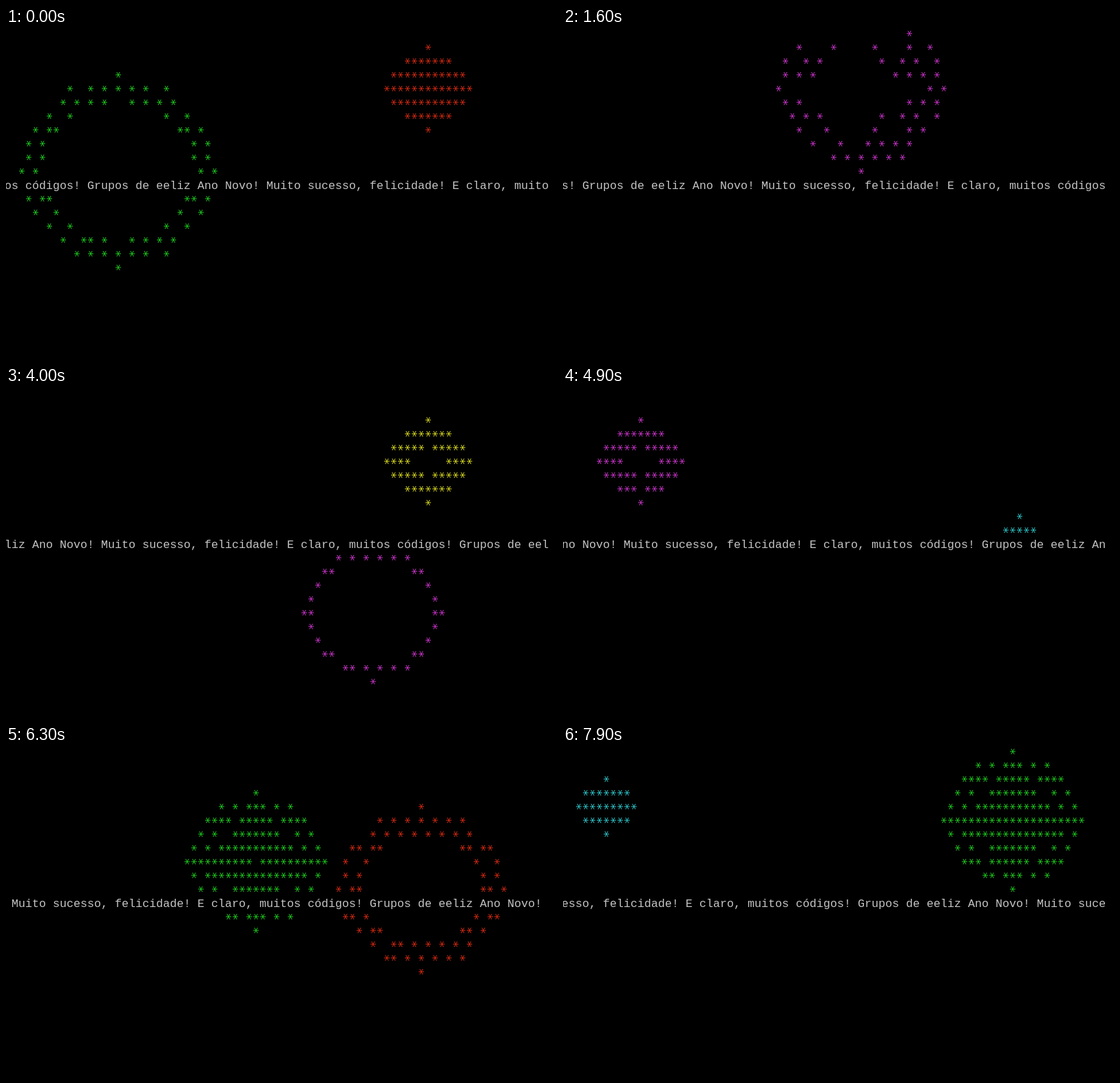
These frames come from a looping animation (800 px wide and 481 px high, 8000 ms). An HTML page with a canvas:

```html
<!DOCTYPE html>
<html lang="pt">
<head>
<meta charset="utf-8">
<style>
  html, body { margin: 0; width: 100%; height: 100%; background: #000; overflow: hidden; }
  canvas { display: block; }
</style>
</head>
<body>
<canvas id="stage" width="800" height="481"></canvas>
<script>
const ctx = document.getElementById('stage').getContext('2d');
const COLS = 80, TEXT_ROW = 11, LOOP = 8000, FIRST_TICK = -13;
const message = 'Grupos de eeliz Ano Novo! Muito sucesso, felicidade! E claro, muitos códigos! ';
const colours = {
  r: '#d42a12', g: '#1fca1f', y: '#d6d622', b: '#3a5ae0',
  m: '#c834c8', c: '#2fc4c8', w: '#d6d6d6'
};

// start tick, centre column, centre row, final radius, colour
const fireworks = [
  [-13, 16, 10, 7, 'g'], [-3, 61, 4, 3, 'r'], [1, 69, 13, 5, 'c'],
  [7, 28, 5, 5, 'y'], [18, 71, 14, 4, 'r'], [19, 42, 4, 6, 'c'],
  [24, 43, 4, 6, 'm'], [34, 20, 13, 5, 'c'], [40, 58, 7, 6, 'w'],
  [52, 34, 15, 5, 'g'], [57, 66, 9, 5, 'r'], [62, 14, 12, 6, 'c'],
  [68, 53, 16, 5, 'm'], [73, 61, 5, 3, 'y'], [80, 22, 8, 6, 'g'],
  [85, 63, 11, 4, 'r'], [91, 11, 5, 3, 'm'], [95, 66, 10, 5, 'c'],
  [98, 39, 6, 7, 'w'], [104, 27, 10, 5, 'y'], [110, 21, 9, 4, 'w'],
  [113, 60, 10, 6, 'r'], [118, 36, 8, 5, 'g'], [126, 14, 7, 6, 'y'],
  [131, 46, 6, 3, 'w'], [137, 62, 10, 6, 'm'], [142, 30, 9, 4, 'c'],
  [144, 38, 12, 5, 'r'], [151, 65, 5, 5, 'g'], [154, 6, 4, 4, 'c']
].reverse();

// Rings are sampled every 10 degrees and truncated to character cells.
function ring(cells, cx, cy, radius, colour) {
  for (let deg = 0; deg < 360; deg += 10) {
    const a = deg * Math.PI / 180;
    const col = cx + Math.trunc(2 * radius * Math.cos(a));
    const row = Math.max(0, cy + Math.trunc(radius * Math.sin(a)));
    if (col >= 0 && col < COLS) cells[row * COLS + col] = colour;
  }
}

// Each firework grows ring by ring, then is wiped from the centre out.
function skyAt(lastTick) {
  const cells = [];
  for (let tick = FIRST_TICK; tick <= lastTick; tick++) {
    for (const [start, x, y, size, key] of fireworks) {
      const step = tick - start;
      if (step < 0 || step > 2 * size + 1) continue;
      if (step <= size) ring(cells, x, y, step, colours[key]);
      else ring(cells, x, y, step - size - 1, null);
    }
  }
  return cells;
}

function star(col, row, colour) {
  const x = col * 10 + 3, y = row * 20 + 8;
  ctx.strokeStyle = colour;
  ctx.beginPath();
  ctx.moveTo(x - 4, y); ctx.lineTo(x + 4, y);
  ctx.moveTo(x - 2.2, y - 4); ctx.lineTo(x + 2.2, y + 4);
  ctx.moveTo(x + 2.2, y - 4); ctx.lineTo(x - 2.2, y + 4);
  ctx.stroke();
}

function drawText(shift) {
  ctx.fillStyle = '#c4c4c4';
  ctx.font = '16.667px "Liberation Mono", "DejaVu Sans Mono", monospace';
  const n = message.length;
  for (let col = 0; col < COLS - 1; col++) {
    ctx.fillText(message[(col + shift - 12 + n) % n], col * 10 - 2, 234);
  }
}

function draw(step) {
  ctx.fillStyle = '#000';
  ctx.fillRect(0, 0, 800, 481);
  ctx.lineWidth = 1;
  const tick = 2 * (step < 28 ? step : step - 1); // one short stall
  skyAt(tick).forEach((colour, i) => {
    const row = Math.floor(i / COLS);
    if (colour && row !== TEXT_ROW) star(i % COLS, row, colour);
  });
  drawText(Math.floor(step * 0.6 + 0.1));
}

let origin, shown = -1;
function tickFrame(now) {
  origin ??= now;
  const step = Math.floor((now - origin) % LOOP / 100);
  if (step !== shown) draw(shown = step);
  requestAnimationFrame(tickFrame);
}
draw(0);
requestAnimationFrame(tickFrame);
</script>
</body>
</html>
```
